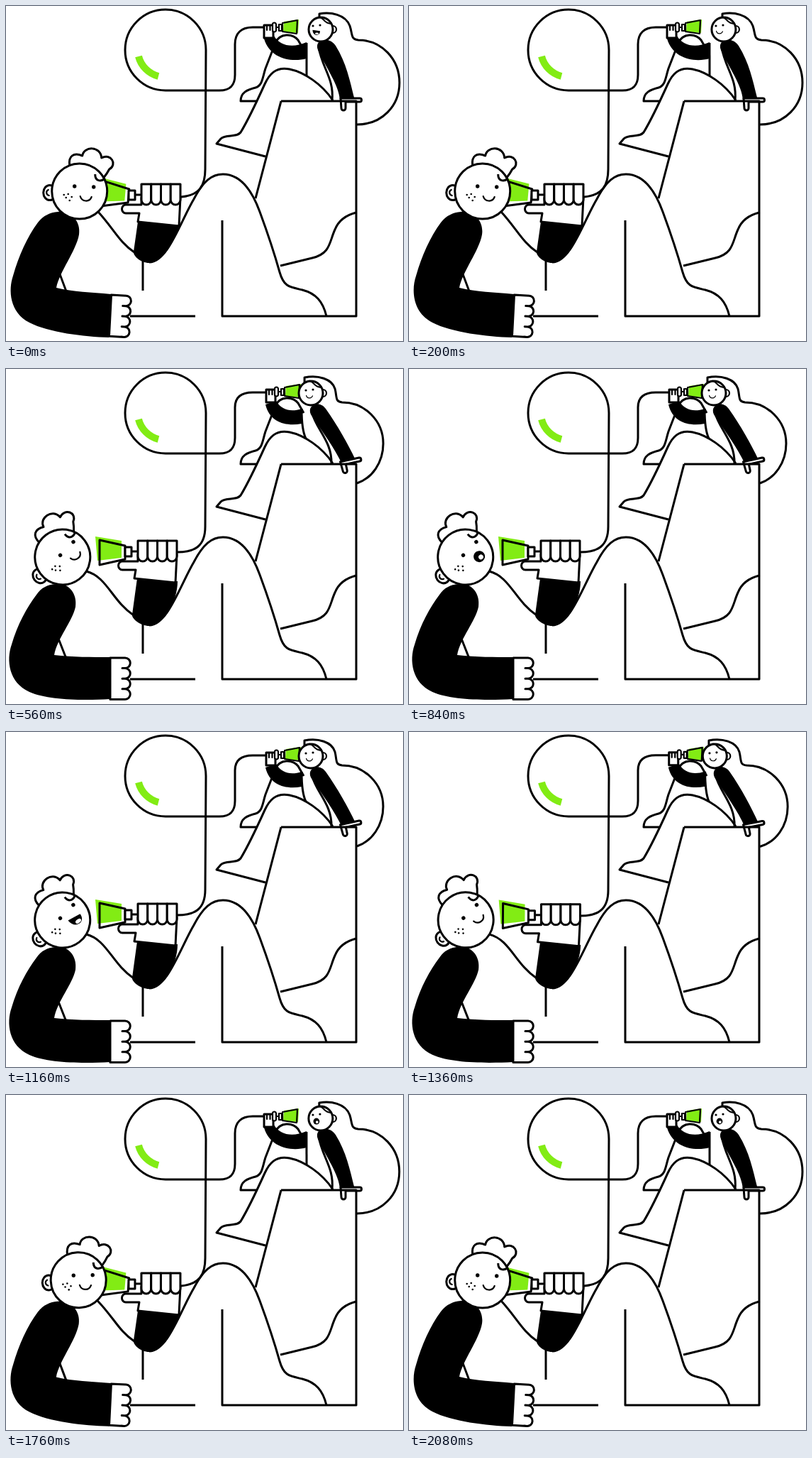
Animation, 560 px wide and 472 px high, one loop 2.12 s. Source, as an HTML page:

```html
<!DOCTYPE html>
<html lang="en">
<head>
<meta charset="utf-8">
<title>Two friends talking</title>
<style>
html, body { margin: 0; width: 100%; height: 100%; overflow: hidden; background: #fff }
svg { display: block; fill: none; stroke: #000; stroke-width: 3; stroke-linejoin: round }
.w { fill: #fff }
.k { fill: #000; stroke: none }
.g { fill: #82ec14; stroke: none }
.t { stroke-width: 2.2; stroke-linecap: round }
</style>
</head>
<body>
<svg id="stage" width="560" height="472" viewBox="0 0 560 472"></svg>
<script>
const stage = document.getElementById('stage');
const LOOP = 2120, STEP = 40;

const clamp = u => Math.max(0, Math.min(1, u));
const cubic = u => u < .5 ? 4 * u ** 3 : 1 - 4 * (1 - u) ** 3;
const smooth = u => u * u * (3 - 2 * u);
const span = (t, a, b) => clamp((t - a) / (b - a));
// 0 = leaning in, 1 = leaning back
const sway = (t, a, b, c, d) => cubic(span(t, a, b)) - smooth(span(t, c, d));
const lerp = (a, b, k) => a + (b - a) * k;

// Blend two paths that share the same commands
function mix(a, b, k) {
  const to = b.match(/-?[\d.]+/g);
  let i = 0;
  return a.replace(/-?[\d.]+/g, n => lerp(+n, +to[i++], k).toFixed(2));
}
const path = (d, cls = '') => `<path class="${cls}" d="${d}"/>`;
const dot = (x, y, r, cls = 'k') => `<circle class="${cls}" cx="${x}" cy="${y}" r="${r}"/>`;
const group = (move, body) => `<g transform="${move}">${body}</g>`;

const smile = path('M-8 -3C-6 5 5 6 8 -2', 't');
const round = dot(0, 0, 8) + dot(1.5, 2, 3.4, 'w" stroke="none" style="stroke:none');
const laugh = path('M-10 -6L9 -3C9 12 -10 10 -10 -6Z', 'k') +
  '<ellipse cx="1" cy="3.5" rx="4.5" ry="2.6" fill="#fff" stroke="none"/>';

const scenery =
  path('M388 134H494V437H305V302M388 134L352 271') +
  path('M387 366L432 355C458 349 456 332 464 315C470 300 482 294 494 291') +
  path('M175 437H267M193 358V401');

const cable = (p, q) =>
  path(mix('M247 269C271 267 281 255 281 230', 'M242 258C266 258 281 250 281 222', q) +
    'L282 62A57 57 0 1 0 225 119H301C317 119 323 111 323 97' +
    mix('V54C323 38 332 30 348 30H364', 'V54C323 39 333 33 348 33H367', q)) +
  '<path d="M187 71A39 39 0 0 0 215 99" style="stroke:#82ec14;stroke-width:10"/>';

function climber(t, q, r) {
  const talk = t > 1700 || t < 200;
  const beat = Math.floor(((t < 200 ? t + LOOP : t) - 1680) / 140);
  const mouth = !talk ? smile : beat % 2 ? laugh : round;
  const hair = path(mix(
    'M442 17V11C458 8 479 12 485 28C489 40 486 47 497 48C530 48 555 75 555 108C555 141 530 167 495 167',
    'M421 20V12C440 8 460 14 464 28C467 40 464 46 474 47C506 47 532 73 532 105C532 132 516 154 495 161', r));
  const legs =
    path('M356 134H331C331 122 340 118 352 115C362 112 362 100 366 88L380 52C386 38 404 38 412 48L420 62') +
    path('M461 133C446 110 420 93 400 89C380 85 371 97 365 110C355 132 342 160 331 178C325 186 310 180 303 187L297 194L366 212L388 134Z',
      'w" style="stroke:none') +
    path('M461 133C446 110 420 93 400 89C380 85 371 97 365 110C355 132 342 160 331 178C325 186 310 180 303 187L297 194L366 212');
  const torso =
    path(mix('M424 52C424 70 424 85 424 98', 'M417 56C417 76 419 90 423 98', q)) +
    path(mix('M441 58C446 88 463 102 460 133', 'M431 60C438 86 460 102 459 133', q));
  const arms =
    path(mix('M364 46L378 42C386 56 404 60 424 51V74C402 80 372 74 364 46Z',
      'M366 50L381 45C389 58 402 61 417 56V77C396 81 372 76 366 50Z', q), 'k') +
    path(mix('M440 62C434 46 456 42 465 56C480 80 485 105 491 129L471 133C470 112 452 88 440 62Z',
      'M430 64C424 50 442 43 451 56C468 80 482 105 493 128L474 134C464 112 446 88 430 64Z', q), 'k');
  const rest = group(`rotate(${-12 * q} 475 133)`,
    path('M472 130H499a2.5 2.5 0 0 1 0 5H479V144a3 3 0 0 1-6 0Z', 'w'));
  const grip = group(`translate(${3 * q} ${2 * q})`,
    path('M392 22L413 19L412 38L391 36Z', 'g') +
    path('M390 24L411 20L410 39L390 36Z', 't') +
    path('M380 30H385M385 26H389V35H385Z', 't') +
    path('M364 27H377V45H364Z', 'w') +
    path('M368 28V34M372.5 28V34', 't') +
    path('M376 26a2.5 2.5 0 0 1 5 0V34a2.5 2.5 0 0 1-5 0Z', 'w t'));
  const head = group(`translate(${lerp(444, 430, q)} ${lerp(33, 34, q)})`,
    dot(17, 0, 5, 'w t') + dot(0, 0, 17, 'w') +
    path('M-3 -17C4 -19 3 -8 15 -8', 't') +
    group(`translate(${4 * q} ${q})`,
      dot(-11, -5, 1.6) + dot(-1, -6, 1.6) +
      group('translate(-6 4) scale(.55)', mouth)));
  return hair + legs + torso + arms + grip + head + rest;
}

function lounger(t, p, q) {
  const talk = t >= 640 && t < 1360;
  const mouth = !talk ? smile : Math.floor((t - 640) / 200) % 2 ? round : laugh;
  const blink = t >= 300 && t < 440;
  const eye = (x, y) => blink ? path(`M${x - 4} ${y}q4 5 8 0`, 't') : dot(x, y, 2.7);
  const freckles = [[-22, 5], [-16, 4], [-11, 8], [-19, 9], [-14, 13]]
    .map(([x, y]) => dot(x, y, 1.3)).join('');

  const body =
    path(mix('M130 290C152 314 160 333 181 347', 'M113 285C142 292 150 327 180 347', p)) +
    path('M202 361C228 361 246 304 265 272C278 247 290 237 306 237C335 237 350 268 358 290C372 328 379 350 386 375C392 396 400 396 418 400C437 405 447 416 452 437') +
    path(mix('M76 378L85 402', 'M74 380L85 408', p));
  const sleeve = path(mix(
    'M186 304L244 310C238 330 222 362 202 362C190 362 179 352 180 346Z',
    'M185 295L242 299C242 328 222 362 202 362C190 362 177 352 178 346Z', q), 'k');

  let fingers = '';
  for (let i = 0; i < 4; i++)
    fingers += path(`M${191 + i * 13.75} 251h13.75V273a6.87 7 0 0 1-13.75 0Z`, 'w');
  const grip = group(`translate(${-5 * q} ${-9 * q})`,
    group(`rotate(${5 * (1 - q)} 173 267)`,
      path('M131 245L168 251V275L134 279Z', 'g') +
      path('M137 250L173 258V277L137 285Z')) +
    path('M182 266H191') + path('M173 260H182V273H173Z', 'w') +
    path('M246 270L244 310L186 304L188 292H169a5.5 6 0 0 1 0-12H191V270Z', 'w') + fingers);

  const arm = path(mix(
    'M73 290C90 288 106 302 103 322C99 345 75 375 71 397C95 403 120 403 148 406L145 467C110 466 60 460 33 446C5 432 3 400 10 380C18 352 30 325 45 305C53 295 62 291 73 290Z',
    'M70 303C86 300 101 315 98 335C94 355 72 380 68 403C95 406 120 406 147 406L147 465C110 467 60 467 33 455C4 442 0 410 8 388C16 360 30 335 43 318C50 308 58 304 70 303Z', p), 'k');
  const knuckle = 'a7.3 7.3 0 0 1 0 14.6h-4h4';
  const fist = group(`rotate(${3 * (1 - p)} 147 436)`,
    path('M147 407H168' + knuckle.repeat(4) + 'H147Z', 'w'));

  const head = group(
    `translate(${lerp(103.7, 79.7, p)} ${261 - 4 * p + 8 * p * p}) rotate(${-37 * p})`,
    '<ellipse class="w" cx="-42" cy="2" rx="9" ry="10.5"/>' +
    path('M-44 -2C-48 0 -47 5 -43 6', 't') +
    path('M-14 -36C-16 -50 -8 -55 4 -50C6 -64 30 -64 31 -47C44 -54 54 -38 42 -31C40 -27 38 -24 34 -19', 'w') +
    dot(0, 0, 39, 'w') +
    path('M22 -24C22 -14 30 -13 36 -18') + freckles +
    eye(lerp(-7, -1, p), lerp(-7, -4, p)) + eye(lerp(20, 25, p), lerp(-6, -8, p)) +
    group(`translate(${lerp(9, 16, p)} ${lerp(10, 11, p)})`, mouth));
  return body + sleeve + grip + arm + fist + head;
}

function draw(now) {
  const t = Math.floor(now % LOOP / STEP) * STEP;
  const p = sway(t, 180, 600, 1320, 1840);
  const q = sway(t, 160, 520, 1260, 1790);
  const r = sway(t, 200, 600, 1260, 1790);
  stage.innerHTML = cable(p, q) + climber(t, q, r) + scenery + lounger(t, p, q);
}

const start = performance.now();
function tick() {
  draw(performance.now() - start);
  requestAnimationFrame(tick);
}
tick();
</script>
</body>
</html>
```
